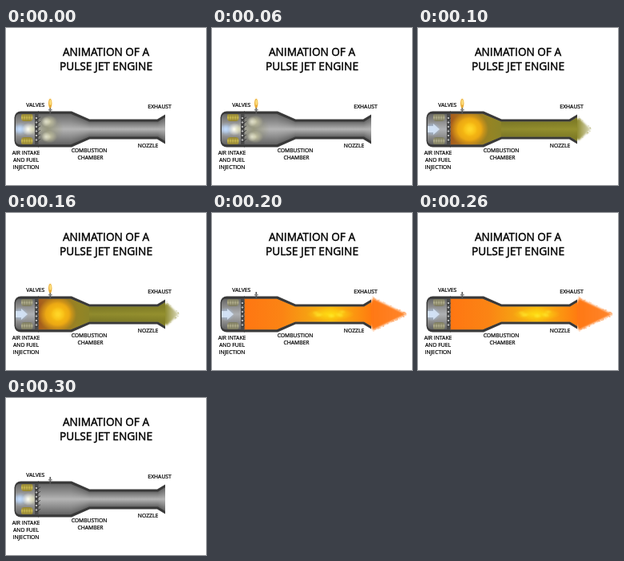
These frames come from a looping animation (250x197 px, 0.4 s). An HTML page with a canvas:

```html
<!DOCTYPE html>
<html lang="en">
<head>
<meta charset="utf-8">
<title>Animation of a pulse jet engine</title>
<style>
html, body { margin: 0; width: 100%; height: 100%; overflow: hidden; background: #fff; }
canvas { display: block; width: 250px; height: 197px; }
</style>
</head>
<body>
<canvas id="stage"></canvas>
<script>
const W = 250, H = 197, STEP = 100;
const MID = 127;
const canvas = document.getElementById('stage');
const ratio = window.devicePixelRatio || 1;
canvas.width = W * ratio;
canvas.height = H * ratio;
const ctx = canvas.getContext('2d');
ctx.scale(ratio, ratio);

// Upper halves of the symmetric engine: x, distance from the axis
const OUTER = [[40, 22.5], [82, 22.5], [104.5, 12.5], [189, 12.5], [199, 18.5]];
const INNER = [[40, 19.2], [81, 19.2], [104, 9.5], [190, 9.5], [199, 15]];

function mirrored(points) {
  const path = new Path2D();
  points.forEach(([x, d]) => path.lineTo(x, MID - d));
  [...points].reverse().forEach(([x, d]) => path.lineTo(x, MID + d));
  path.closePath();
  return path;
}

function rounded(x, y, w, h, radii) {
  const path = new Path2D();
  path.roundRect(x, y, w, h, radii);
  return path;
}

const shell = mirrored(OUTER);
const bore = mirrored(INNER);
const housing = rounded(10.5, MID - 22.5, 30.5, 45, [8, 0, 0, 8]);
const intake = rounded(12, MID - 19.2, 28.5, 38.4, [5, 0, 0, 5]);

function gradient(x0, y0, x1, y1, stops) {
  const g = ctx.createLinearGradient(x0, y0, x1, y1);
  stops.forEach(([at, color]) => g.addColorStop(at, color));
  return g;
}

function glow(x, y, rx, ry, rgb, alpha, core = 0) {
  ctx.save();
  ctx.translate(x, y);
  ctx.scale(rx, ry);
  const g = ctx.createRadialGradient(0, 0, core, 0, 0, 1);
  g.addColorStop(0, `rgba(${rgb},${alpha})`);
  g.addColorStop(1, `rgba(${rgb},0)`);
  ctx.fillStyle = g;
  ctx.fillRect(-1, -1, 2, 2);
  ctx.restore();
}

function within(path, draw) {
  ctx.save();
  ctx.clip(path);
  draw();
  ctx.restore();
}

function ellipse(x, y, rx, ry, color) {
  ctx.fillStyle = color;
  ctx.beginPath();
  ctx.ellipse(x, y, rx, ry, 0, 0, Math.PI * 2);
  ctx.fill();
}

function polygon(points, color) {
  ctx.fillStyle = color;
  ctx.beginPath();
  points.forEach(([x, y]) => ctx.lineTo(x, y));
  ctx.fill();
}

function label(text, x, y, size = 6.8) {
  ctx.font = `${size}px "Open Sans", "Noto Sans", sans-serif`;
  ctx.lineWidth = size / 30;
  ctx.fillText(text, x, y);
  ctx.strokeText(text, x, y);
}

function labels() {
  ctx.fillStyle = ctx.strokeStyle = '#000';
  ctx.textAlign = 'center';
  label('ANIMATION OF A', 125, 35.4, 13.6);
  label('PULSE JET ENGINE', 125, 52.6, 13.7);
  label('VALVES', 36.8, 98.8);
  label('EXHAUST', 192.1, 101);
  label('COMBUSTION', 104, 155.9);
  label('CHAMBER', 105.5, 164.9);
  label('NOZZLE', 177.5, 150);
  label('AIR INTAKE', 25, 159.2);
  label('AND FUEL', 25, 168.3);
  label('INJECTION', 25, 177.4);
}

// Small seeded generator for ragged edges
function noise(seed) {
  return () => (seed = (seed * 16807) % 2147483647) / 2147483647;
}

function plume(tip, half, rgb, tail, specks) {
  const rand = noise(41);
  const fade = gradient(199, 0, tip, 0, [[0, `rgb(${rgb})`], [1, `rgba(${rgb},${tail})`]]);
  ctx.save();
  ctx.filter = 'blur(0.9px)';
  polygon([[197, MID - 11], [201, MID - half], [tip, MID],
    [201, MID + half], [197, MID + 11]], fade);
  ctx.restore();
  for (let i = 0; i < specks; i++) {
    const t = rand();
    const side = rand() < 0.5 ? -1 : 1;
    const y = MID + side * (half * (1 - t) + rand() * 2);
    ellipse(201 + t * (tip - 201), y, 0.8, 0.6, `rgba(${rgb},0.35)`);
  }
}

// Radius of the bore at x
function boreRadius(x) {
  const i = Math.max(1, INNER.findIndex(([px]) => px >= x));
  const [x0, d0] = INNER[i - 1], [x1, d1] = INNER[i];
  return d0 + (d1 - d0) * (x - x0) / (x1 - x0);
}

function steelBore() {
  for (let x = 40; x < 199; x++) {
    const r = boreRadius(x + 0.5);
    ctx.fillStyle = gradient(0, MID - r, 0, MID + r, [
      [0, '#666'], [0.25, '#8c8c8c'], [0.5, '#b4b4b4'], [0.75, '#8c8c8c'], [1, '#626262']
    ]);
    ctx.fillRect(x, 100, 1, 54);
  }
}

function charge() {
  glow(52, MID, 20, 20, '125,125,75', 0.5);
  for (const y of [MID - 9.5, MID + 9.5]) {
    glow(54, y, 10, 8, '222,220,180', 0.75);
    glow(50, y, 6, 6, '250,250,230', 0.65);
  }
}

function ignition() {
  ctx.fillStyle = gradient(40, 0, 200, 0, [
    [0, '#a4581c'], [0.05, '#a8681c'], [0.2, '#a37a20'], [0.32, '#948424'], [0.43, '#89842a'], [1, '#8f8b2b']
  ]);
  ctx.fillRect(40, 100, 162, 54);
  ctx.fillStyle = gradient(0, MID - 10, 0, MID + 10, [
    [0, 'rgba(70,70,20,.2)'], [0.5, 'rgba(165,160,55,.25)'], [1, 'rgba(70,70,20,.2)']
  ]);
  ctx.fillRect(104, 100, 96, 54);
  glow(64, MID, 24, 22, '232,163,20', 1, 0.6);
  glow(65, MID, 17, 16, '248,188,18', 0.95, 0.4);
  glow(65, MID, 9, 9, '255,214,40', 0.95, 0.2);
}

function blast() {
  ctx.fillStyle = gradient(40, 0, 200, 0, [
    [0, '#ff7612'], [0.3, '#fb8414'], [0.5, '#f6a012'], [0.68, '#f9bd0c'], [0.84, '#fb9a10'], [1, '#ff7a10']
  ]);
  ctx.fillRect(40, 100, 162, 54);
  glow(148, MID, 30, 8, '255,224,20', 0.9);
  const rand = noise(17);
  for (let i = 0; i < 8; i++) {
    glow(130 + rand() * 36, MID - 3 + rand() * 6, 5, 3, '255,236,50', 0.45);
  }
}

const GOLD = ['#8f8030', '#c8b850'];
const DULL = ['#78765a', '#b0ad8c'];
const PHASES = [
  { fill: charge, pods: GOLD, inflow: true, open: true, spark: true },
  { fill: ignition, pods: DULL, spark: true, plume: [216, 14, '143,139,47', 0.3, 14] },
  { fill: blast, pods: DULL, plume: [243, 20, '255,120,20', 0.9, 60] },
  { pods: GOLD, inflow: true, open: true }
];

function pods([dark, light]) {
  for (const side of [-1, 1]) {
    const y = MID + side * 14.5;
    ctx.fillStyle = gradient(0, y - 4.5, 0, y + 4.5, [[0, dark], [0.5, light], [1, dark]]);
    ctx.fill(rounded(19, y - 4.5, 14.5, 9, side < 0 ? [2, 2, 4, 4] : [4, 4, 2, 2]));
    ctx.fillStyle = dark;
    for (let x = 21.5; x < 33; x += 3) ctx.fillRect(x, y - 3, 0.6, 6);
  }
}

function intakeAir(phase) {
  ctx.fillStyle = gradient(0, MID - 19, 0, MID + 19, [
    [0, '#666'], [0.3, '#959595'], [0.5, '#aeb0b3'], [0.7, '#959595'], [1, '#626262']
  ]);
  ctx.fillRect(11, 105, 31, 44);
  pods(phase.pods);
  glow(18, MID, 10, 9, '165,198,242', 0.85);
  if (phase.inflow) {
    glow(17, MID, 7, 6, '200,224,255', 0.9);
    glow(28, MID, 8, 8, '255,255,245', 0.95, 0.1);
    glow(33, MID, 6, 8, '230,228,175', 0.6);
  } else {
    polygon([[12, MID - 4], [19, MID - 4], [19, MID - 7], [27, MID],
      [19, MID + 7], [19, MID + 4], [12, MID + 4]], 'rgba(220,234,252,.8)');
  }
}

function valves(phase) {
  ctx.fillStyle = '#4b4b4b';
  ctx.fillRect(36, MID - 19.2, 4.5, 38.4);
  for (let i = 0; i < 6; i++) {
    const y = MID + (i - 2.5) * 5.5;
    ellipse(38.3, y, 2.1, 2, '#292929');
    ellipse(38, y - 0.2, 1.4, 1.3, '#b8b8b8');
    if (phase.open) {
      ctx.strokeStyle = '#383838';
      ctx.lineWidth = 0.9;
      ctx.beginPath();
      ctx.moveTo(39.5, y + 1);
      ctx.lineTo(43, y - 1.5);
      ctx.stroke();
    }
  }
}

function plug(spark) {
  ctx.fillStyle = '#555';
  ctx.fillRect(54.5, 99, 1.6, 9);
  ctx.fillStyle = '#888';
  ctx.fillRect(53, 101.8, 4.6, 1.6);
  if (!spark) return;
  glow(55.2, 94.5, 4, 8, '255,205,85', 0.6);
  ellipse(55.2, 94.6, 2, 5.8, '#e9a82e');
  ellipse(55.4, 93.4, 1.1, 3.4, '#ffe587');
}

function engine(phase) {
  ctx.fillStyle = '#393939';
  ctx.fill(housing);
  ctx.fill(shell);
  within(bore, () => {
    steelBore();
    if (phase.fill) phase.fill();
  });
  within(intake, () => intakeAir(phase));
  valves(phase);
  plug(phase.spark);
}

function draw(now) {
  const phase = PHASES[Math.floor(now / STEP) % PHASES.length];
  ctx.fillStyle = '#fff';
  ctx.fillRect(0, 0, W, H);
  if (phase.plume) plume(...phase.plume);
  engine(phase);
  labels();
}

const start = performance.now();
function tick() {
  draw(performance.now() - start);
  requestAnimationFrame(tick);
}
tick();
</script>
</body>
</html>
```
